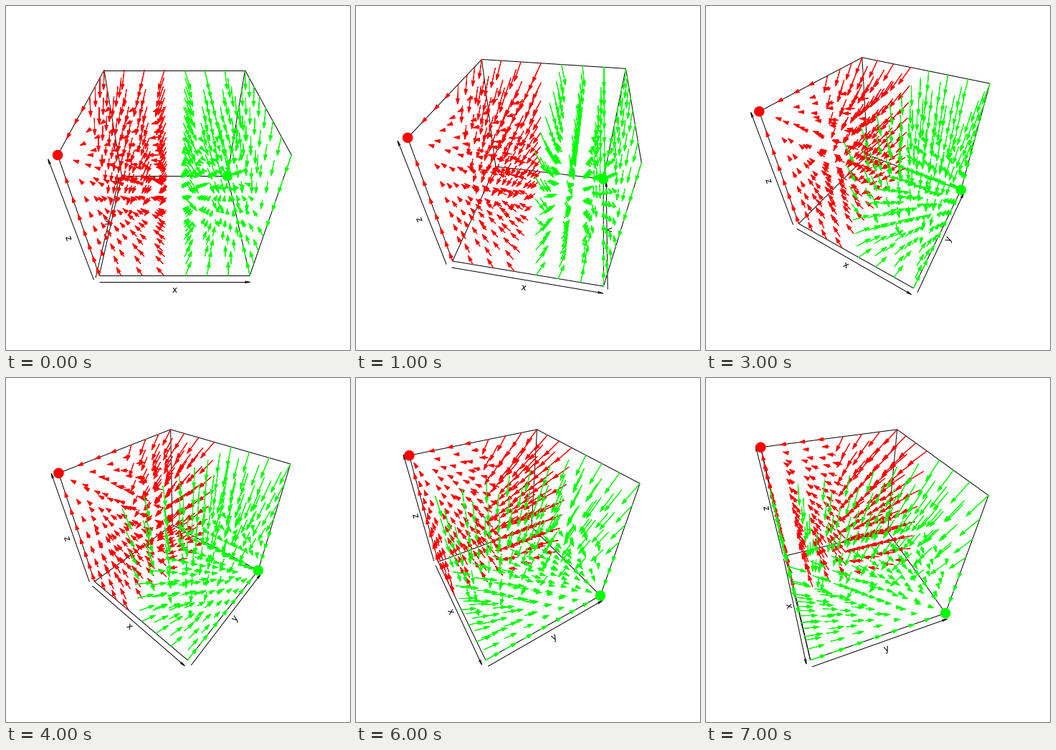
Animation, 480 px wide and 480 px high, one loop 8 s. Source, as a matplotlib script:

```python
import itertools

import numpy as np
import matplotlib.pyplot as plt
from matplotlib.animation import FuncAnimation
from matplotlib.collections import LineCollection, PolyCollection

SIZE = 480
DPI = 100
PT = 72 / DPI                      # points per pixel
STEPS = 8
TURN = 10                          # degrees per step
PHI = np.radians(40)
CAM = np.sqrt(3) + 2               # eye distance from the cube centre
CENTER = np.array([235.2, 232.8])
ROOM = np.array([326.2, 321.8])    # space for the projected cube
TICK = 0.06
DROP = 2                           # labels sit a little below their anchor
RED, GREEN = "#ff0000", "#00ff00"

CORNERS = np.array(list(itertools.product((-1, 1), repeat=3)), float)


class View:
    """Perspective camera, fitted so the cube fills the plot area."""

    def __init__(self, theta):
        self.theta = np.radians(theta)
        self.mid, self.scale = np.zeros(2), 1.0
        p = self.flat(CORNERS)
        lo, hi = p.min(axis=0), p.max(axis=0)
        self.mid = (lo + hi) / 2
        self.scale = (ROOM / (hi - lo)).min()

    def split(self, pts):
        x, y, z = np.asarray(pts, float).T
        c, s = np.cos(self.theta), np.sin(self.theta)
        right, away = x * c + y * s, y * c - x * s
        up = z * np.cos(PHI) + away * np.sin(PHI)
        dist = CAM + away * np.cos(PHI) - z * np.sin(PHI)
        return right, up, dist

    def flat(self, pts):
        right, up, dist = self.split(pts)
        p = np.column_stack([right / dist, up / dist])
        return (p - self.mid) * self.scale

    def px(self, pts):
        return CENTER + self.flat(pts) * [1, -1]

    def dist(self, pts):
        return self.split(pts)[2]

    def eye(self):
        return CAM * np.array([np.cos(PHI) * np.sin(self.theta),
                               -np.cos(PHI) * np.cos(self.theta),
                               np.sin(PHI)])


def flow(p):
    """Boolean net: x keeps itself, y = x and not z, z = not (x or y)."""
    x, y, z = p.T > 0
    goal = np.column_stack([x, x & ~z, ~(x | y)]) * 2.0 - 1
    return 0.1 * (goal - p)


def box_edges(eye):
    """Edges of all cube faces that turn away from the eye."""
    edges = set()
    for axis, side in itertools.product(range(3), (-1, 1)):
        if eye[axis] * side > 1:
            continue
        face = [tuple(c) for c in CORNERS if c[axis] == side]
        for a, b in itertools.combinations(face, 2):
            if np.abs(np.subtract(a, b)).sum() == 2:
                edges.add((a, b))
    return sorted(edges)


def axis_rules(step):
    """Start, end and outward direction of the x, y and z axis arrows."""
    side = 1 if step else -1
    return [((-1, -1, -1), (1, -1, -1), (0, -1, -1)),
            ((side, -1, -1), (side, 1, -1), (side, 0, -1)),
            ((-1, -1, -1), (-1, -1, 1), (-1, -1, 0))]


def open_arrow(a, b, length=7.2, angle=np.radians(10)):
    back = np.arctan2(*(a - b)[::-1])
    barbs = [b + length * np.array([np.cos(back + t), np.sin(back + t)])
             for t in (-angle, angle)]
    return [np.array([a, b]), np.array([barbs[0], b, barbs[1]])]


def solid_arrow(a, b, length=7.4, half=2.4):
    d = (b - a) / np.hypot(*(b - a))
    n = np.array([-d[1], d[0]])
    base = b - length * d
    return np.array([a, b, base + half * n, base - half * n, b, a])


def disc(c, r=6.75):
    t = np.linspace(0, 2 * np.pi, 40)
    return c + r * np.column_stack([np.cos(t), np.sin(t)])


grid = np.linspace(-1, 1, 8)
starts = np.array(list(itertools.product(grid, repeat=3)))
moves = flow(starts)
moving = np.abs(moves).max(axis=1) > 1e-9
rest = starts[~moving]
starts, moves = starts[moving], moves[moving]


def hue(p):
    return RED if p[0] < 0 else GREEN


fig = plt.figure(figsize=(SIZE / DPI, SIZE / DPI), dpi=DPI, facecolor="white")
ax = fig.add_axes([0, 0, 1, 1])
ax.set_xlim(0, SIZE)
ax.set_ylim(SIZE, 0)
ax.axis("off")

frame_lines = LineCollection([], colors="black", linewidths=PT, zorder=1)
field = PolyCollection([], closed=True, linewidths=PT, antialiaseds=True,
                       joinstyle="round", zorder=3)
ax.add_collection(frame_lines)
ax.add_collection(field)
labels = [ax.text(0, 0, s, fontsize=12 * PT, family="DejaVu Sans",
                  ha="center", va="center", zorder=2) for s in "xyz"]


def draw(step):
    view = View(step * TURN)

    lines = [view.px(edge) for edge in box_edges(view.eye())]
    for label, (a, b, out) in zip(labels, axis_rules(step)):
        a, b, out = np.array([a, b, out], float)
        p, q = view.px([a + TICK * out, b + TICK * out])
        lines += open_arrow(p, q)
        d = q - p if q[0] >= p[0] else p - q
        tilt = np.arctan2(-d[1], d[0])
        spot = view.px([(a + b) / 2 + 2 * TICK * out])[0]
        label.set_position(spot + DROP * np.array([np.sin(tilt), np.cos(tilt)]))
        label.set_rotation(np.degrees(tilt))
    frame_lines.set_segments(lines)

    tails, tips = view.px(starts), view.px(starts + moves)
    shapes = [solid_arrow(a, b) for a, b in zip(tails, tips)]
    shapes += [disc(c) for c in view.px(rest)]
    colors = [hue(p) for p in starts] + [hue(p) for p in rest]
    depth = np.concatenate([view.dist(starts + moves / 2), view.dist(rest)])
    order = np.argsort(-depth, kind="stable")
    field.set_verts([shapes[i] for i in order])
    field.set_facecolor([colors[i] for i in order])
    field.set_edgecolor([colors[i] for i in order])
    return [frame_lines, field, *labels]


anim = FuncAnimation(fig, draw, frames=STEPS, interval=1000,
                     init_func=lambda: draw(0), repeat=True, repeat_delay=0)
plt.show()
```
